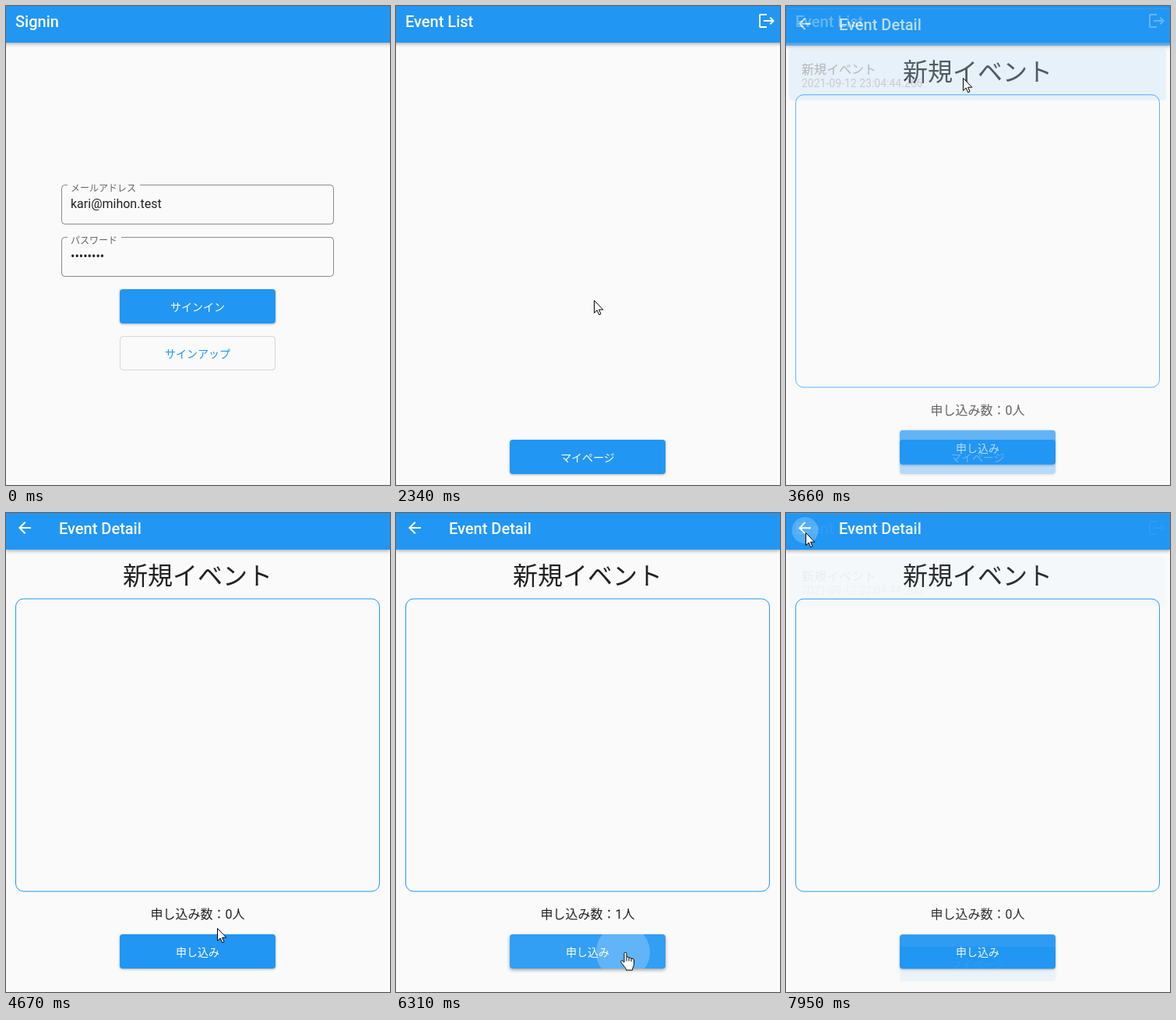
Recreate the animation shown at these times as an HTML page. Size 493x614 px, loop 8000 ms.

```html
<!DOCTYPE html>
<html lang="ja">
<head>
<meta charset="utf-8">
<title>Event sign-up</title>
<style>
  html, body { margin: 0; width: 100%; height: 100%; overflow: hidden; background: #fafafa; }
  svg { display: block; width: 493px; height: 614px; }
  text { font-family: Roboto, "Noto Sans CJK JP", "Noto Sans CJK", sans-serif; font-size: 16px; fill: rgba(0,0,0,.87); white-space: pre; }
  .bar { fill: #2196f3; filter: drop-shadow(0 2px 2px rgba(0,0,0,.28)); }
  .title { font-size: 20px; font-weight: 500; fill: #fff; }
  .icon { fill: #fff; }
  .label { font-size: 12px; fill: rgba(0,0,0,.6); }
  .field { fill: none; stroke: rgba(0,0,0,.45); }
  .btn text { font-size: 14px; font-weight: 500; fill: #fff; text-anchor: middle; }
  .btn .face { fill: #2196f3; filter: drop-shadow(0 1.5px 1.5px rgba(0,0,0,.28)); }
  .btn.hover .face { filter: drop-shadow(0 2px 2px rgba(0,0,0,.34)); }
  .btn .tint, .btn .ripple { fill: #fff; }
  .btn .tint { opacity: 0; }
  .btn.hover .tint { opacity: .08; }
  .btn.outline .face { fill: none; stroke: rgba(0,0,0,.14); filter: none; }
  .btn.outline text, .btn.outline .tint { fill: #2196f3; }
  .btn.outline.hover .tint { opacity: .04; }
  .card { fill: #bbdefb; filter: drop-shadow(0 1px .5px rgba(0,0,0,.1)); }
  .sub { font-size: 14px; fill: rgba(0,0,0,.54); }
  .mid { text-anchor: middle; }
  .cursor path { fill: #fff; stroke: #000; stroke-linejoin: round; }
  .cursor .crease { fill: none; }
</style>
</head>
<body>
<svg viewBox="0 0 493 614">
  <defs>
    <clipPath id="cardClip"><rect x="4" y="55" width="484" height="65" rx="4"/></clipPath>
  </defs>

  <g id="signin">
    <rect class="bar" x="-9" y="-9" width="511" height="56"/>
    <text class="title" x="12" y="27">Signin</text>
    <path class="field" d="M79 229.500H75.500a4 4 0 0 0-4 4V275.500a4 4 0 0 0 4 4H416.500a4 4 0 0 0 4-4V233.500a4 4 0 0 0-4-4H172"/>
    <text class="label" x="83" y="237.500">メールアドレス</text>
    <text x="83" y="259">kari@mihon.test</text>
    <path class="field" d="M79 296.500H75.500a4 4 0 0 0-4 4V342.500a4 4 0 0 0 4 4H416.500a4 4 0 0 0 4-4V300.500a4 4 0 0 0-4-4H148"/>
    <text class="label" x="83" y="304.500">パスワード</text>
    <text x="83" y="326">••••••••</text>
  </g>

  <g id="list">
    <rect class="bar" x="-9" y="-9" width="511" height="56"/>
    <text class="title" x="12" y="27">Event List</text>
    <path class="icon" transform="translate(464 7)" d="M17 7l-1.410 1.410L18.170 11H8v2h10.170l-2.580 2.580L17 17l5-5zM4 5h8V3H4c-1.100 0-2 .9-2 2v14c0 1.100.9 2 2 2h8v-2H4z"/>
    <g id="card">
      <rect class="card" x="4" y="55" width="484" height="65" rx="4"/>
      <g clip-path="url(#cardClip)"><circle id="cardRipple" fill="#c8c8c8"/></g>
      <text x="20" y="87">新規イベント</text>
      <text class="sub" x="20" y="104">2021-09-12 23:04:44.266</text>
    </g>
  </g>

  <g id="detail">
    <rect width="493" height="614" fill="#fafafa"/>
    <rect class="bar" width="493" height="47"/>
    <circle id="backRipple" cx="24.500" cy="22" fill="#fff"/>
    <path class="icon" transform="translate(12 7)" d="M20 11H7.830l5.590-5.590L12 4l-8 8 8 8 1.410-1.410L7.830 13H20z"/>
    <text class="title" x="68" y="27">Event Detail</text>
    <text class="mid" x="246" y="92" style="font-size:32px">新規イベント</text>
    <rect x="12.500" y="110" width="467" height="375" rx="10" fill="none" stroke="#2196f3"/>
    <text class="mid" x="246" y="520">申し込み数：<tspan id="count">0</tspan>人</text>
  </g>

  <g id="cursor" class="cursor">
    <path id="arrow" d="M.5 .5V16.500L4.200 13L6.700 18.800L9 17.800L6.600 12.200H11.800Z"/>
    <g id="hand" transform="translate(-6 -.5)">
      <path d="M5 2C5 .3 8 .3 8 2V7C9 6 11 6.500 11 8C12 7 14 7.500 14 9C15 8.300 17.500 8.800 17.500 10.500V16C17.500 18.500 15.500 20 15.500 23.500H7.500C7.500 20.500 3 17 1 13.500C0 11.500 2 10.500 3.500 12L5 13.500Z"/>
      <path class="crease" d="M8 7V12M11 8V12M14 9V12.500"/>
    </g>
  </g>
</svg>
<script>
const LOOP = 8000, TICK = 78, START = 460;
const $ = id => document.getElementById(id);
const clamp = v => Math.min(1, Math.max(0, v));
const lerp = (a, b, p) => a + (b - a) * p;
const show = (el, on) => { el.style.display = on ? '' : 'none'; };

function bezier(x1, y1, x2, y2) {
  const at = (a, b, u) => 3 * a * u * (1 - u) ** 2 + 3 * b * u * u * (1 - u) + u ** 3;
  return x => {
    if (x <= 0 || x >= 1) return clamp(x);
    let lo = 0, hi = 1;
    for (let i = 0; i < 24; i++) {
      const m = (lo + hi) / 2;
      if (at(x1, x2, m) < x) lo = m; else hi = m;
    }
    return at(y1, y2, lo);
  };
}
const ease = bezier(.25, .1, .25, 1);
const easeIn = bezier(.42, 0, 1, 1);
const easeInOut = bezier(.42, 0, .58, 1);
const fastOutSlowIn = bezier(.4, 0, .2, 1);

const X = 146, W = 200, H = 44;

function makeButton(page, y, label, kind = '') {
  const outline = kind === 'outline', inset = outline ? .5 : 0;
  const g = document.createElementNS('http://www.w3.org/2000/svg', 'g');
  g.setAttribute('class', 'btn ' + kind);
  g.innerHTML = `
    <clipPath id="clip${y}"><rect x="${X}" y="${y}" width="${W}" height="${H}" rx="4"/></clipPath>
    <rect class="face" x="${X + inset}" y="${y + inset}" width="${W - 2 * inset}" height="${H - 2 * inset}" rx="4"/>
    <rect class="tint" x="${X}" y="${y}" width="${W}" height="${H}" rx="4"/>
    <g clip-path="url(#clip${y})"><circle class="ripple" r="0"/></g>
    <text x="246" y="${y + 28}">${label}</text>`;
  $(page).append(g);
  return { page, y, g, ripple: g.querySelector('.ripple') };
}

const signIn = makeButton('signin', 363, 'サインイン');
const signUp = makeButton('signin', 423, 'サインアップ', 'outline');
const myPage = makeButton('list', 556, 'マイページ');
const apply = makeButton('detail', 540, '申し込み');
const buttons = [signIn, signUp, myPage, apply];

// Pointer stops: time, x, y
const stops = [
  [460, 453, 590], [1084, 254, 377], [2800, 254, 377], [3034, 207, 134],
  [3112, 227, 92], [4030, 227, 92], [4810, 274, 562], [5452, 274, 562],
  [5680, 291, 563], [5910, 292, 563], [6250, 294, 563], [7070, 294, 563], [7860, 25, 25]
];

function pointerAt(t) {
  const i = stops.findIndex(s => s[0] > t);
  if (i === 0) return stops[0].slice(1);
  if (i < 0) return stops[stops.length - 1].slice(1);
  const [t0, x0, y0] = stops[i - 1], [t1, x1, y1] = stops[i];
  const p = easeInOut((t - t0) / (t1 - t0));
  return [Math.round(lerp(x0, x1, p)), Math.round(lerp(y0, y1, p))];
}

// Ink spreads slowly while held, quickly after release, then fades.
function ink(el, t, press, release, cx, cy, reach, strength) {
  const [px, py] = pointerAt(press);
  const size = at => lerp(reach * .3, reach + 5, ease(clamp((at - press) / 1000)));
  const held = Math.min(t, release);
  const freed = ease(clamp((t - release) / 225));
  const r = lerp(size(held), reach + 5, freed);
  const drift = lerp(ease(clamp((held - press) / 1000)), 1, freed);
  const fade = clamp((t - press) / 75) * (1 - clamp((t - release - 225) / 150));
  el.setAttribute('cx', lerp(px, cx, drift));
  el.setAttribute('cy', lerp(py, cy, drift));
  el.setAttribute('r', r);
  el.setAttribute('opacity', strength * fade);
}
const buttonInk = (b, t, press, release) =>
  ink(b.ripple, t, press, release, X + W / 2, b.y + H / 2, 102, .24);

function render(t) {
  const page = t < 2330 ? 'signin' : t < 3418 ? 'list' : 'detail';
  const open = t < 7936 ? clamp((t - 3418) / 300) : 1 - clamp((t - 7936) / 300);
  show($('signin'), page === 'signin');
  show($('list'), page !== 'signin' && open < 1);
  show($('card'), t >= 2410);
  show($('detail'), open > 0);
  $('detail').setAttribute('opacity', easeIn(open));
  $('detail').setAttribute('transform', `translate(0 ${153.5 * (1 - fastOutSlowIn(open))})`);

  const [x, y] = pointerAt(t);
  let over = page === 'list' && t >= 2410 && y > 55 && y < 120;
  for (const b of buttons) {
    const hit = t >= START && b.page === page && x >= X && x < X + W && y >= b.y && y < b.y + H;
    b.g.classList.toggle('hover', hit);
    over = over || hit;
  }
  show($('cursor'), t >= START);
  $('cursor').setAttribute('transform', `translate(${x} ${y})`);
  show($('hand'), over);
  show($('arrow'), !over);

  buttonInk(signIn, t, 1285, 1560);
  if (t < 6000) buttonInk(apply, t, 4890, 5110);
  else buttonInk(apply, t, 6240, 6420);
  ink($('cardRipple'), t, 3150, 3280, 246, 87, 245, .4);

  const back = clamp((t - 7800) / 148);
  $('backRipple').setAttribute('r', 17 * back);
  $('backRipple').setAttribute('opacity', .24 * back);

  $('count').textContent = t >= 5520 && t < 6770 ? '1' : '0';
  $('count').style.fill = t >= 6770 && t < 6850 ? '#245f92' : '';
}

// The screen refreshes in fixed steps.
const begin = performance.now();
function frame(now) {
  const t = Math.max(0, now - begin) % LOOP;
  render(START + Math.floor((t + 16 - START) / TICK) * TICK);
  requestAnimationFrame(frame);
}
render(0);
requestAnimationFrame(frame);
</script>
</body>
</html>
```
